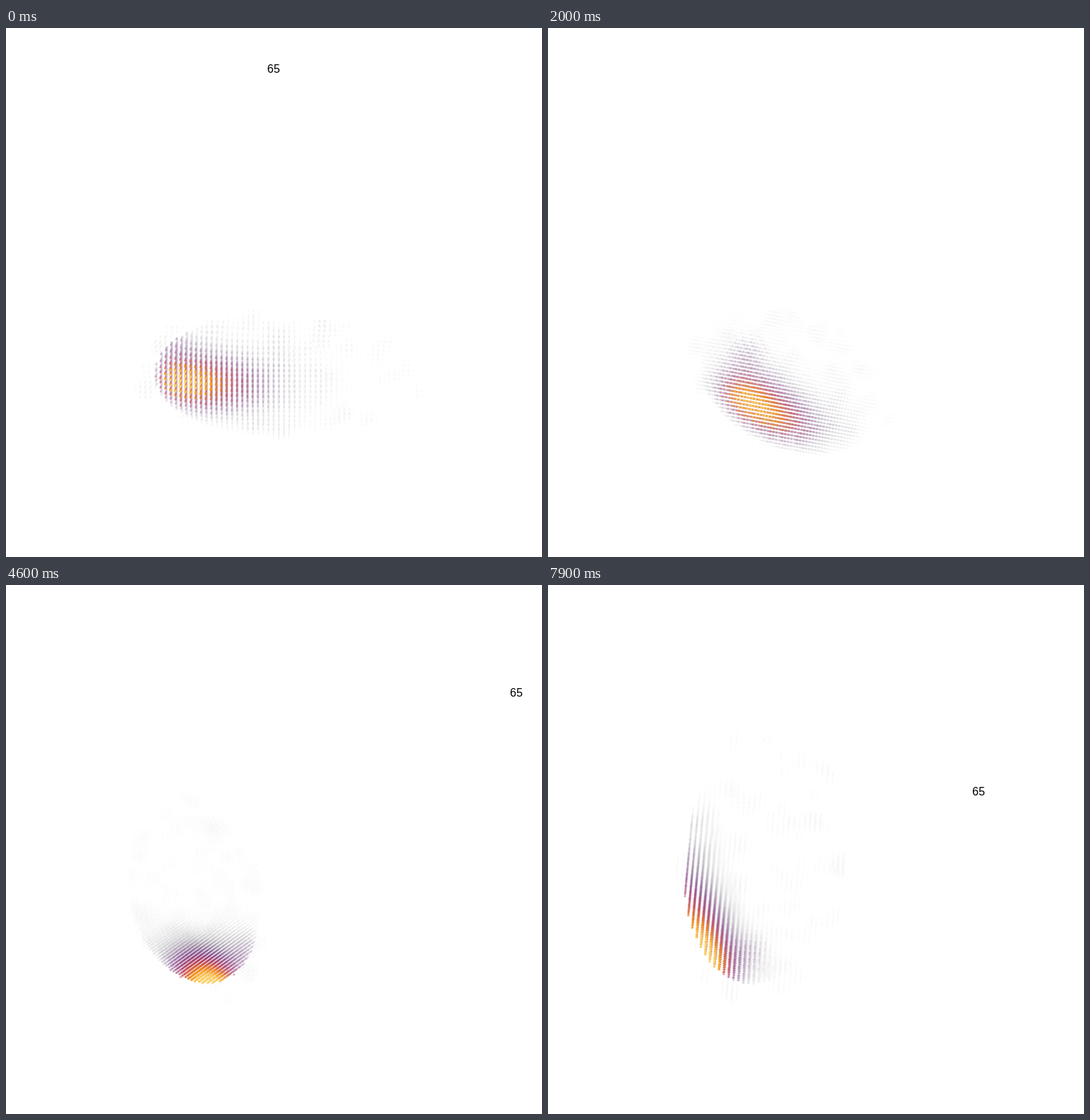
These frames come from a looping animation (753x744 px, 8000 ms). An HTML page with a canvas:

```html
<!DOCTYPE html>
<html lang="en">
<head>
<meta charset="utf-8">
<style>
  html, body { margin: 0; width: 100%; height: 100%; overflow: hidden; background: #fff; }
  canvas { display: block; }
</style>
</head>
<body>
<canvas id="stage" width="753" height="744"></canvas>
<script>
const ctx = document.getElementById('stage').getContext('2d');
const LOOP = 8000, STEP = 100, GRID = 7, DEPTH = 3000;
const DEGREES_PER_SECOND = 32;

// World axes at time zero: x right, y down, z away; everything turns about the pivot
const PIVOT = { x: 376, y: 372 };
const AXIS = unit([.56, -.71, .43]);
const LABEL = [0, -338, 220];
const CENTRE = [0, 112, -65], TILT = .14;

// Cloud axes: length, width, height
const SIZE = [215, 119, 88];
const CORE = [185, 105, 88], CORE_SHIFT = [20, 0, 0];
const HOT = [-138, -60, 0], TRAIL = [112, -45, -2], PLUME = [-142, -4, -42];
const trailDir = unit(TRAIL), trailLength = Math.hypot(...TRAIL);

function dot(a, b) { return a[0] * b[0] + a[1] * b[1] + a[2] * b[2]; }
function sub(a, b) { return a.map((v, i) => v - b[i]); }
function unit(a) { return a.map(v => v / Math.hypot(...a)); }
function cross(a, b) {
  return [a[1] * b[2] - a[2] * b[1], a[2] * b[0] - a[0] * b[2], a[0] * b[1] - a[1] * b[0]];
}
function bell(d, s) { return Math.exp(-d * d / (s * s)); }
function radius(p, size) { return Math.hypot(...p.map((v, i) => v / size[i])); }

function rotate(p, angle) {
  const c = Math.cos(angle), s = Math.sin(angle);
  const side = cross(AXIS, p), along = dot(AXIS, p) * (1 - c);
  return p.map((v, i) => v * c + side[i] * s + AXIS[i] * along);
}

function toWorld([a, b, c]) {
  const cos = Math.cos(TILT), sin = Math.sin(TILT);
  return [CENTRE[0] + a, CENTRE[1] + c * cos - b * sin, CENTRE[2] + b * cos + c * sin];
}

let seed = 65;
function random() {
  seed = (seed * 1664525 + 1013904223) % 4294967296;
  return seed / 4294967296;
}

const ramp = [[0, 0, 4], [87, 16, 110], [188, 55, 84], [249, 142, 9], [252, 255, 164]];
function colour(v) {
  const f = Math.min(v, .9) * 4, i = Math.floor(f);
  const rgb = ramp[i].map((c, k) => Math.round(c + (ramp[i + 1][k] - c) * (f - i)));
  return `rgba(${rgb},${Math.min(.9, 1.1 * v ** 1.3).toFixed(3)})`;
}

// Faint patches scattered over the outer shell
const patches = Array.from({ length: 90 }, () => {
  const z = random() * 2 - 1, a = random() * 2 * Math.PI, r = Math.sqrt(1 - z * z);
  const dir = [r * Math.cos(a), r * Math.sin(a), z];
  const depth = .7 + .28 * random();
  return { at: dir.map((d, k) => d * SIZE[k] * depth), size: 7 + random() * 9 };
});

function activity(p) {
  let v = 0;
  for (const { at, size } of patches) v += .048 * bell(Math.hypot(...sub(p, at)), size);
  v = Math.min(v, .052);

  const shell = radius(sub(p, CORE_SHIFT), CORE);
  if (shell > 1) return v;
  const d = sub(p, HOT), t = dot(d, trailDir);
  const r = Math.sqrt(Math.max(0, dot(d, d) - t * t));
  const beyond = t - Math.max(0, Math.min(trailLength, t));
  return v
    + .95 * bell(t, t < 0 ? 42 : 105) * bell(r, 36)
    + .2 * bell(Math.hypot(...sub(p, PLUME)), 28)
    + .1 * shell * shell * bell(beyond, 120) * bell(r, 78);
}

const points = [];
const [na, nb, nc] = SIZE.map(s => Math.floor(s / GRID));
for (let i = -na; i <= na; i++)
  for (let j = -nb; j <= nb; j++)
    for (let k = -nc; k <= nc; k++) {
      const p = [i * GRID, j * GRID, k * GRID];
      if (radius(p, SIZE) > 1) continue;
      const v = activity(p);
      if (v > .012) points.push({ p: toWorld(p), v, fill: colour(v) });
    }
points.sort((a, b) => a.v - b.v);

function project(p, angle) {
  const [x, y, z] = rotate(p, angle);
  const scale = DEPTH / (DEPTH + z);
  return { x: PIVOT.x + x * scale, y: PIVOT.y + y * scale, scale };
}

function draw(seconds) {
  const angle = seconds * DEGREES_PER_SECOND * Math.PI / 180;
  ctx.fillStyle = '#fff';
  ctx.fillRect(0, 0, 753, 744);

  for (const { p, fill } of points) {
    const { x, y, scale } = project(p, angle);
    ctx.fillStyle = fill;
    ctx.beginPath();
    ctx.arc(x, y, 1.6 * scale, 0, 7);
    ctx.fill();
  }

  const { x, y } = project(LABEL, angle);
  ctx.fillStyle = '#000';
  ctx.font = '16px "Liberation Sans", Arial, sans-serif';
  ctx.textAlign = 'center';
  ctx.fillText('65', Math.round(x), Math.round(y + 5.5));
}

let shown = -1;
const start = performance.now();
function tick() {
  const step = Math.floor((performance.now() - start) % LOOP / STEP);
  if (step !== shown) draw((shown = step) * STEP / 1000);
  requestAnimationFrame(tick);
}
tick();
</script>
</body>
</html>
```
